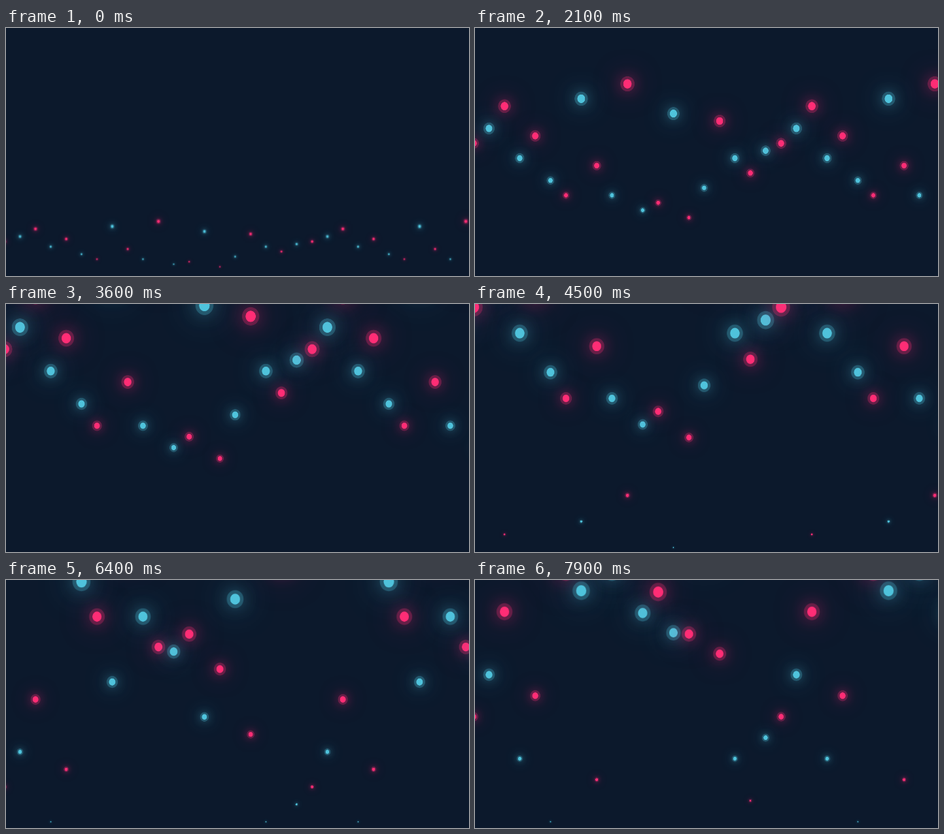
An HTML page without scripts that plays this animation: 708 px wide and 380 px high, repeating every 8 s.

```html
<!DOCTYPE html>
<html lang="en">
<head>
<meta charset="utf-8">
<title>Rising bubbles</title>
<style>
html, body {
  margin: 0;
  width: 100%;
  height: 100%;
  overflow: hidden;
  background: #0c192c;
}
.stage {
  position: relative;
  width: 100%;
  height: 100%;
  overflow: hidden;
  overflow: clip;
  contain: strict;
}
.bubbles {
  position: absolute;
  left: -38px;
  top: 0;
  display: flex;
}
.bubbles i {
  --c: #ff2d75;
  --ring: #ff2d7544;
  --x: .1px;
  position: relative;
  flex: none;
  width: 23px;
  height: 0;
}
.bubbles i:nth-child(odd) {
  --c: #4fc3dc;
  --ring: #4fc3dc44;
  --x: .4px;
  width: 24px;
}
/* Each column holds two bubbles, the second one full trip behind the first.
   --i is the speed: a trip lasts 125.15s / i. */
.bubbles i::before,
.bubbles i::after {
  --p: calc(var(--i) * 1.078 / 125.15 - var(--lag));
  --q: calc(var(--i) * 9.078 / 125.15 - var(--lag));
  content: "";
  position: absolute;
  left: 3px;
  top: -10px;
  width: 18px;
  height: 20px;
  border-radius: 50%;
  background: var(--c);
  box-shadow: 0 0 0 6.4px var(--ring), 0 0 32px var(--c), 0 0 64px var(--c);
  animation: rise 8s steps(80) -10ms infinite;
}
.bubbles i::before { --lag: 0; }
.bubbles i::after { --lag: 1; }
@keyframes rise {
  from { transform: translate(var(--x), calc(404.4px - 448.4px * var(--p))) scale(var(--p)); }
  to { transform: translate(var(--x), calc(404.4px - 448.4px * var(--q))) scale(var(--q)); }
}
</style>
</head>
<body>
<div class="stage">
  <div class="bubbles">
    <i style="--i:19"></i>
    <i style="--i:20"></i>
    <i style="--i:22"></i>
    <i style="--i:25"></i>
    <i style="--i:18"></i>
    <i style="--i:21"></i>
    <i style="--i:15"></i>
    <i style="--i:13"></i>
    <i style="--i:26"></i>
    <i style="--i:17"></i>
    <i style="--i:13"></i>
    <i style="--i:28"></i>
    <i style="--i:11"></i>
    <i style="--i:12"></i>
    <i style="--i:24"></i>
    <i style="--i:10"></i>
    <i style="--i:14"></i>
    <i style="--i:23"></i>
    <i style="--i:18"></i>
    <i style="--i:16"></i>
    <i style="--i:19"></i>
    <i style="--i:20"></i>
    <i style="--i:22"></i>
    <i style="--i:25"></i>
    <i style="--i:18"></i>
    <i style="--i:21"></i>
    <i style="--i:15"></i>
    <i style="--i:13"></i>
    <i style="--i:26"></i>
    <i style="--i:17"></i>
    <i style="--i:13"></i>
    <i style="--i:28"></i>
    <i style="--i:11"></i>
  </div>
</div>
</body>
</html>
```
